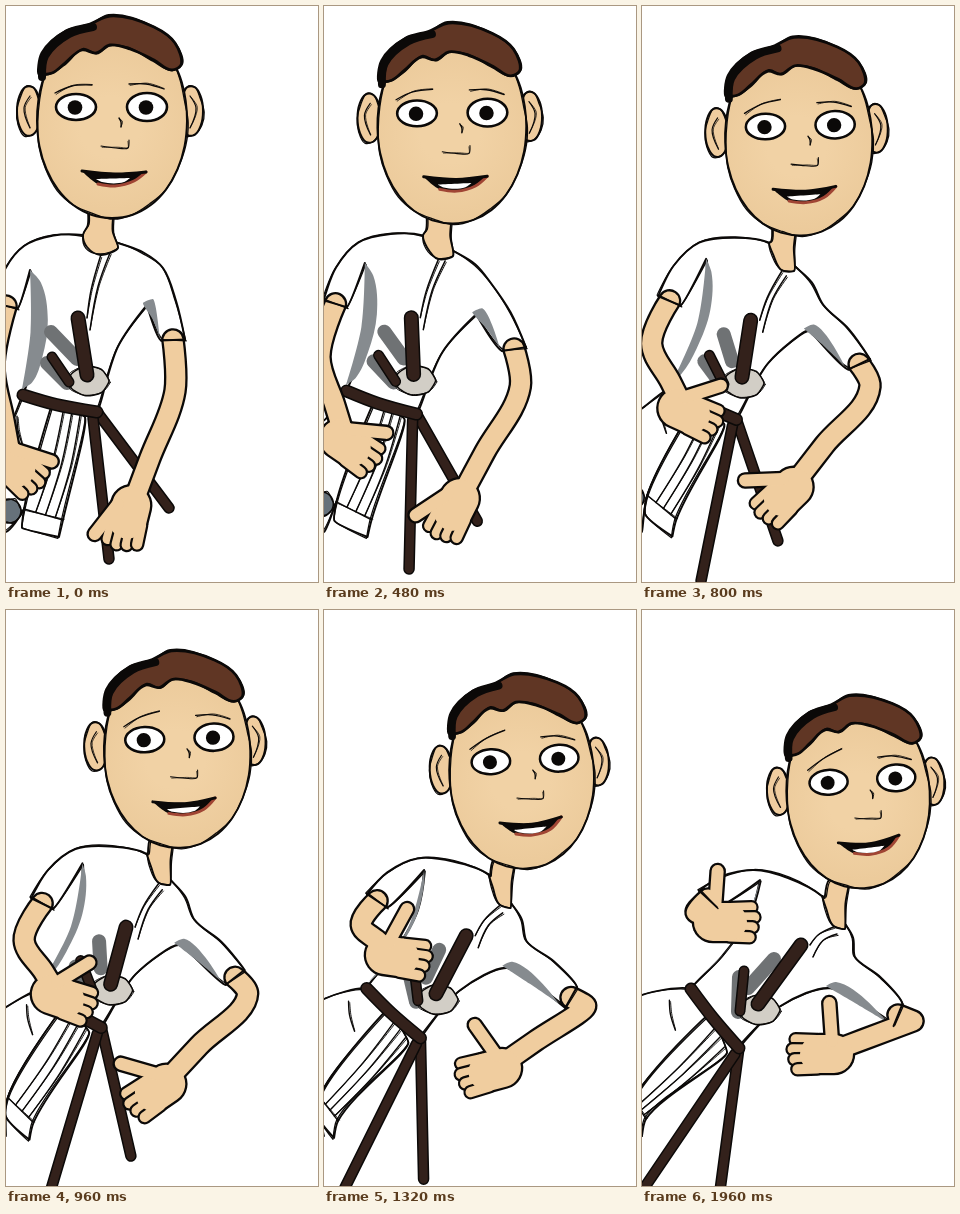
Animation, 312 px wide and 576 px high, one loop 2 s. Source, as an HTML page with a canvas:

```html
<!DOCTYPE html>
<html lang="en">
<head>
<meta charset="utf-8">
<title>Thumbs up</title>
<style>
html, body { margin: 0; width: 100%; height: 100%; overflow: hidden; background: #fff; }
canvas { display: block; width: 312px; height: 576px; }
</style>
</head>
<body>
<canvas id="stage" width="312" height="576"></canvas>
<script>
const ctx = document.getElementById('stage').getContext('2d');
const LOOP = 2000, STEP = 40, SWING = 1960;
const INK = '#0b0908', SKIN = '#f0cd9f', WOOD = '#33211b', HAIR = '#603624', GREY = '#868b8f';

// Joints of the puppet: where each one starts, passes and ends.
const rig = {
  head: [[104, 111], [164, 136], [214, 182]],
  neckL: [[77, 229], [136, 241], [180, 286]],
  neckR: [[112, 237], [160, 266], [203, 314]],
  shoulderL: [[18, 240], [65, 238], [112, 260]],
  shoulderR: [[157, 262], [186, 306], [213, 347]],
  armpitL: [[24, 264], [72, 253], [118, 270]],
  armpitR: [[141, 299], [170, 331], [188, 378]],
  cuffL: [[0, 300], [33, 294], [66, 289]],
  cuffR: [[167, 334], [225, 364], [256, 405]],
  elbowL: [[-12, 360], [15, 333], [54, 302]],
  elbowR: [[169, 385], [237, 382], [271, 411]],
  handL: [[6, 458], [50, 394], [80, 312]],
  handR: [[123, 508], [150, 482], [183, 444]],
  waistL: [[17, 389], [33, 380], [49, 379]],
  knot: [[91, 406], [95, 416], [97, 438]],
  guard: [[83, 375], [105, 379], [118, 400]],
  hilt: [[72, 312], [116, 316], [159, 335]],
  dagger: [[46, 351], [72, 350], [102, 361]],
  sheathA: [[163, 502], [129, 542], [77, 588]],
  sheathB: [[103, 553], [50, 578], [-6, 590]],
  hip: [[2, 422], [0, 399], [-5, 387]],
  hemL: [[18, 503], [3, 488], [-8, 490]],
  hemR: [[53, 531], [26, 530], [0, 526]]
};

const lerp = (a, b, t) => a + (b - a) * t;
const mix = (a, b, t) => [lerp(a[0], b[0], t), lerp(a[1], b[1], t)];
const add = (p, x, y) => [p[0] + x, p[1] + y];
const polar = (p, angle, r) => add(p, Math.cos(angle) * r, Math.sin(angle) * r);
const rad = deg => deg * Math.PI / 180;

function unit(a, b) {
  const x = b[0] - a[0], y = b[1] - a[1], n = Math.hypot(x, y) || 1;
  return [x / n, y / n];
}

// Ease in and out, slightly ahead of a plain cosine.
function progress(t) {
  const u = Math.min(1, t / SWING);
  return .5 - .5 * Math.cos(Math.PI * (u + .04 * Math.sin(Math.PI * u)));
}

// Parabola that starts at a, passes m halfway and ends at b.
function pose(p) {
  const out = {};
  for (const [name, [a, m, b]] of Object.entries(rig)) {
    const mid = mix(a, b, .5), bend = 4 * p * (1 - p);
    out[name] = add(mix(a, b, p), (m[0] - mid[0]) * bend, (m[1] - mid[1]) * bend);
  }
  return out;
}

// Smooth path whose sharp turns stay sharp; a higher round softens them.
function curve(p, closed, round = .5) {
  const n = p.length, path = new Path2D();
  const dirs = p.map((q, i) => {
    if (!closed && (i === 0 || i === n - 1)) return [0, 0];
    const a = unit(p[(i + n - 1) % n], q), b = unit(q, p[(i + 1) % n]);
    const k = Math.max(0, Math.min(1, a[0] * b[0] + a[1] * b[1] + round));
    const d = unit([0, 0], [a[0] + b[0], a[1] + b[1]]);
    return [d[0] * k, d[1] * k];
  });
  path.moveTo(...p[0]);
  for (let i = 0; i < (closed ? n : n - 1); i++) {
    const j = (i + 1) % n, a = p[i], b = p[j];
    const d = Math.hypot(b[0] - a[0], b[1] - a[1]) / 3;
    path.bezierCurveTo(a[0] + dirs[i][0] * d, a[1] + dirs[i][1] * d,
      b[0] - dirs[j][0] * d, b[1] - dirs[j][1] * d, b[0], b[1]);
  }
  if (closed) path.closePath();
  return path;
}

function stroke(path, width, color = INK) {
  ctx.lineWidth = width;
  ctx.strokeStyle = color;
  ctx.stroke(path);
}

function fill(points, color, round) {
  ctx.fillStyle = color;
  ctx.fill(curve(points, true, round));
}

// Two slightly different passes give the inked sketch line.
function ink(points, closed = false, width = 1.8, round = .5) {
  const loose = points.map((p, i) => add(p, Math.sin(i * 7.3 + 1) * 1.4, Math.cos(i * 4.1) * 1.4));
  stroke(curve(points, closed, round), width);
  stroke(curve(loose, closed, round), width * .65);
}

function shape(points, color, width, round) {
  fill(points, color, round);
  ink(points, true, width, round);
}

function rod(points, width, color = WOOD, edge = 3) {
  const path = curve(points, false);
  if (edge) stroke(path, width, INK);
  stroke(path, width - edge, color);
}

function ring(cx, cy, rx, ry, count = 16) {
  return Array.from({ length: count }, (_, i) => {
    const a = i / count * 2 * Math.PI;
    return [cx + rx * Math.cos(a), cy + ry * Math.sin(a)];
  });
}

// The hand points along angle; side tells where the thumb is.
function arm(cuff, elbow, palm, angle, side, open) {
  const local = (x, y) => polar(polar(palm, angle, x), angle + side * Math.PI / 2, y);
  const root = local(-7, 13);
  const bone = curve([cuff, elbow, mix(elbow, palm, .55), palm], false, .7);
  const body = curve([local(-9, 0), local(6, 0)], false);
  const thumb = curve([root, polar(root, angle + side * open, 38)], false);
  const parts = [[bone, 19], [body, 38], [thumb, 12]];

  for (const [path, width] of parts) stroke(path, width + 4.6);
  for (let i = 0; i < 4; i++) {
    const y = 14 - i * 9.5, reach = 33 - Math.abs(i - 1.2) * 3;
    rod([local(8, y), local(reach, y * 1.05)], 14.5, SKIN, 4.4);
  }
  for (const [path, width] of parts) stroke(path, width, SKIN);
}

function cuffEnds(cuff, elbow) {
  const [x, y] = unit(cuff, elbow);
  return [add(cuff, y * 12, -x * 12), add(cuff, -y * 12, x * 12)];
}

function drawSkirt(j) {
  const corner = add(j.hemL, -2, 19), edge = add(j.hemR, 4, -17);
  const top = mix(j.waistL, j.knot, .4), right = add(j.knot, -12, 5);
  shape([j.waistL, j.hip, add(j.hip, -25, 20), [-30, 525], [0, 526], j.hemL, top], '#fff', 1.8, 0);
  shape(ring(j.hemL[0] - 15, j.hemL[1] + 2, 12, 12), '#66717a', 1.6);
  shape([top, j.hemL, corner, j.hemR, edge, right], '#fff', 1.9, 0);
  ink([j.hemL, edge], false, 1.4);
  for (let i = 0; i < 3; i++) {
    const from = mix(top, right, .35 + i * .25), to = mix(j.hemL, edge, .3 + i * .25);
    ink([from, add(mix(from, to, .5), 3, 0), to], false, 1.4);
  }
  const fold = mix(j.hip, j.waistL, .6);
  ink([add(fold, 0, 8), add(fold, 1, 22), add(fold, 6, 38)], false, 1.4);
}

function drawTorso(j, p) {
  const [inL, outL] = cuffEnds(j.cuffL, j.elbowL);
  const [outR, inR] = cuffEnds(j.cuffR, j.elbowR);
  const side = t => add(mix(j.armpitL, j.waistL, t), 16 * Math.sin(Math.PI * t) - 4 * t, 0);
  shape([
    j.neckL, add(mix(j.neckL, j.shoulderL, .5), 0, -5), j.shoulderL,
    add(mix(j.shoulderL, outL, .5), -5, -4), outL, inL, j.armpitL, side(.35), side(.7),
    j.waistL, j.knot, add(mix(j.armpitR, j.knot, .5), -4, -12), j.armpitR, inR, outR,
    add(mix(j.shoulderR, outR, .5), 2, -3), j.shoulderR, add(mix(j.neckR, j.shoulderR, .5), 3, -3), j.neckR
  ], '#fff', 2, .1);

  const depth = 10 * (1 - p);
  const shade = [.1, .4, .7, .9].map(t => add(side(t), depth * .7, 0));
  fill([j.armpitL, ...shade, side(.95), add(side(.5), -depth, 0)], GREY);
  fill([add(j.armpitR, -4, -2), add(j.armpitR, 6, -6), mix(j.armpitR, inR, .9), mix(j.armpitR, inR, .4)], GREY);

  const collar = mix(j.neckL, j.neckR, .5);
  ink([add(collar, 0, 17), add(mix(collar, j.hilt, .6), 4, 4), add(j.hilt, 9, 0)], false, 1.5);
  ink([add(j.neckR, -8, 10), add(mix(j.neckR, j.hilt, .5), 0, 6), add(j.hilt, 12, 12)], false, 1.5);
}

function drawSwords(j) {
  const grey = '#6f7274', [x, y] = j.guard;
  rod([add(j.hilt, -27, 14), add(j.guard, -12, -22)], 14, grey, 0);
  rod([add(j.dagger, -5, 6), add(j.guard, -22, 2)], 14, grey, 0);
  shape(ring(x, y, 20, 15, 7), '#d2cec6', 1.5, 0);
  rod([j.dagger, add(j.guard, -20, 1)], 11);
  rod([j.hilt, add(j.guard, -2, -6)], 15);
}

function drawNeck(j, p) {
  const top = add(j.head, -9 - 8 * p, 88), base = mix(j.neckL, j.neckR, .5);
  const half = 12 - 2 * p;
  shape([
    add(top, -half, 0), add(mix(top, base, .6), -half - 1, 0), j.neckL, add(j.neckL, 4, 12),
    add(base, 0, 16), add(j.neckR, 0, 5), add(mix(top, base, .65), half, 4), add(top, half, 0)
  ], SKIN, 1.9, .4);
}

function eye(x, y, ry) {
  const white = new Path2D(), pupil = new Path2D();
  white.ellipse(x, y, 20, ry, 0, 0, 7);
  pupil.arc(x - 1, y + .5, 7.3, 0, 7);
  ctx.fillStyle = '#fff';
  ctx.fill(white);
  stroke(white, 2.6);
  ctx.fillStyle = INK;
  ctx.fill(pupil);
}

function drawMouth(p) {
  const left = [-28, 54], right = [36, 55 - 5 * p], low = 69 - p;
  const lower = [left, [-12, low - 2], [5, low], [24, low - 5], right];
  fill([...lower, [5, 56]], INK, .5);
  stroke(curve(lower.slice(1, 4).concat([right]), false), 3, '#a04534');
  fill([[-14, 62], [20, 61 - p], [14, 65], [-8, 65]], '#fff', .2);
  stroke(curve([left, [5, 57], right], false), 3);
}

function drawHead(j, p) {
  ctx.save();
  ctx.translate(...j.head);
  ctx.rotate(-.065 * p);
  ctx.scale(1 - .045 * p, 1 - .045 * p);
  for (const side of [-1, 1]) {
    shape(ring(side * 81, -6, 12, 25, 10), SKIN, 2);
    ink([[side * 80, -21], [side * 86, -9], [side * 80, 11]], false, 1.2);
  }

  const glow = ctx.createRadialGradient(0, 10, 30, 0, 10, 105);
  glow.addColorStop(0, '#f1d2a5');
  glow.addColorStop(1, '#eac898');
  const face = ring(0, 0, 1, 1, 24).map(([c, s]) =>
    [2 + 75 * Math.sign(c) * Math.abs(c) ** (s > 0 ? .95 : .5), 4 + 97 * s * (s > 0 ? 1 : .8)]);
  shape(face, glow, 2);

  const crown = [[-71, -43], [-68, -64], [-44, -86], [-20, -93], [0, -101], [44, -90], [65, -74], [71, -52]];
  const fringe = [[62, -47], [44, -57], [20, -68], [0, -72], [-14, -64], [-28, -67], [-45, -54], [-58, -44]];
  shape([...crown, ...fringe], HAIR, 2.8);
  stroke(curve(crown.slice(0, 4).map(q => add(q, 3, 3)), false), 8);

  ctx.translate(6 * p, -2 * p);
  eye(-34, -10, 13);
  eye(37, -10, 14);
  ink([[-55, -24], [-38, -31 - 4 * p], [-18, -32 - 12 * p]], false, 1.3);
  ink([[19, -33], [36, -33], [54, -28]], false, 1.3);
  ink([[9, 1], [11, 5], [11, 10]], false, 1.4);
  ink([[-9, 29], [6, 31], [18, 31], [19, 23]], false, 1.1);
  drawMouth(p);
  ctx.restore();
}

function draw(t) {
  const p = progress(t), j = pose(p);
  const open = rad(24 + 62 * p ** 1.4);
  ctx.fillStyle = '#fff';
  ctx.fillRect(0, 0, 312, 576);
  drawSkirt(j);
  rod([j.knot, j.sheathA], 11.5);
  rod([add(j.knot, -4, 6), j.sheathB], 11.5);
  drawTorso(j, p);
  rod([j.waistL, add(mix(j.waistL, j.knot, .45), 0, 2), j.knot], 13);
  drawSwords(j);
  drawNeck(j, p);
  drawHead(j, p);
  arm(j.cuffL, j.elbowL, j.handL, rad(lerp(42, 0, p)), -1, open);
  arm(j.cuffR, j.elbowR, j.handR, rad(lerp(104, 180, p)), 1, open);
  for (const side of ['L', 'R']) ink(cuffEnds(j['cuff' + side], j['elbow' + side]), false, 2);
}

ctx.lineCap = ctx.lineJoin = 'round';
const start = performance.now();
function tick() {
  const t = (performance.now() - start) % LOOP;
  draw(Math.floor(t / STEP) * STEP);
  requestAnimationFrame(tick);
}
tick();
</script>
</body>
</html>
```
